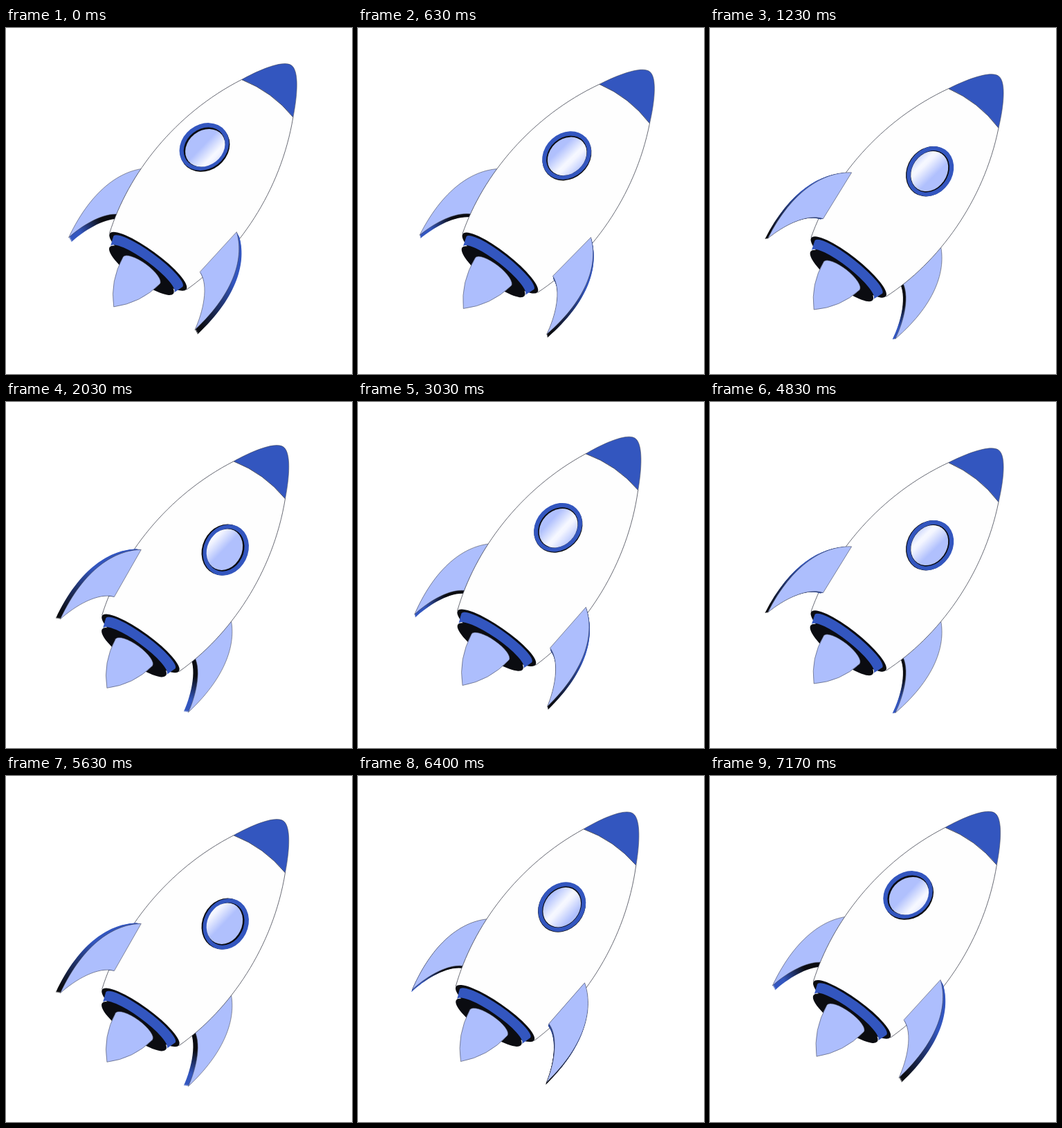
An HTML page with a canvas for the animation above (7210 ms loop, 500 px wide and 500 px high).

```html
<!DOCTYPE html>
<html>
<head>
<meta charset="utf-8">
<style>
html, body { margin: 0; width: 100%; height: 100%; overflow: hidden; background: #fff; }
canvas { display: block; }
</style>
</head>
<body>
<canvas id="stage" width="500" height="500"></canvas>
<script>
const ctx = document.getElementById('stage').getContext('2d');
const LOOP = 7210, SWAY = 3600;
const BLUE = '#3356bf', LIGHT = '#adbefd', BLACK = '#0b0c11', LINE = '#3c3f4c';

// Upright rocket: the origin is the centre of the base, the nose points up.
const body = new Path2D('M-69 0C-98 -85 -95 -195 -46 -292Q0 -304 46 -292C95 -195 98 -85 69 0Z');
const nose = new Path2D('M-46 -292C-33 -320 -14 -351 0 -351C14 -351 33 -320 46 -292Q0 -304 -46 -292Z');
const collar = new Path2D('M-62 0A62 13 0 0 1 62 0L57 14A57 13 0 0 0 -57 14Z');
const finShape = new Path2D('M81.5 -110C112 -88 134 -40 118 40C112 12 96 -24 72.5 -32Z');

function paint(path, fill, line) {
  ctx.fillStyle = fill;
  ctx.fill(path);
  if (line) {
    ctx.strokeStyle = LINE;
    ctx.lineWidth = line;
    ctx.stroke(path);
  }
}

function oval(x, y, rx, ry, fill, turn = 0) {
  const path = new Path2D();
  path.ellipse(x, y, rx, ry, turn, 0, 2 * Math.PI);
  paint(path, fill);
}

function blend(x0, y0, x1, y1, ...stops) {
  const g = ctx.createLinearGradient(x0, y0, x1, y1);
  stops.forEach(([at, color]) => g.addColorStop(at, color));
  return g;
}

// side is 1 for the right fin, -1 for the left one; shift moves its far face.
function fin(side, shift) {
  const squash = Math.sqrt(1 - (shift / 24) ** 2);
  const edge = side * shift < 0
    ? blend(0, -50, 0, 30, [0, BLUE], [1, BLACK])
    : blend(0, -10, 0, 22, [0, BLACK], [1, BLUE]);
  for (let i = 8; i >= 0; i--) {
    ctx.save();
    ctx.translate(-shift * i / 8, 3.2 * i / 8);
    ctx.scale(side * squash, 1);
    paint(finShape, i ? edge : LIGHT, i ? 0 : 0.5);
    ctx.restore();
  }
}

function porthole(lat, shift) {
  ctx.save();
  ctx.translate(lat, -181.4);
  const turn = -lat * Math.PI / 360, slide = -shift * 0.28;
  oval(slide * 0.6, 0.5, 32.2, 38, BLACK, turn);
  oval(-slide * 0.4, -0.3, 32, 38, BLUE, turn);
  oval(-slide * 0.2, 0, 26, 32, BLACK, turn);
  const glint = -0.85 * lat - 10;
  oval(slide * 0.7, 0.3, 25, 30.8,
    blend(glint - 20, 0, glint + 24, 6, [0, '#b0c0fd'], [0.45, '#f6f8ff'], [0.55, '#f3f5ff'], [1, '#b0c0fd']), turn);
  ctx.restore();
}

function flame(t) {
  const tip = 82 + 4 * Math.cos(2 * Math.PI * t / 240 - 4.8);
  const mid = tip * 0.67;
  paint(new Path2D(`M-33 16A33 11 0 0 1 33 16Q27 ${mid} -1.3 ${tip}Q-28 ${mid} -33 16Z`), LIGHT, 0.5);
}

function draw(t) {
  const a = 2 * Math.PI * t / SWAY;
  const wave = (mid, c, s) => mid + c * Math.cos(a) + s * Math.sin(a);
  const lat = wave(-5.5, -26.2, -2.4);
  const shift = (lat + 4) * 0.25;
  const near = shift < 0 ? 1 : -1;

  ctx.fillStyle = '#fff';
  ctx.fillRect(0, 0, 500, 500);
  ctx.save();
  ctx.translate(wave(200.3, 5, 3.2), wave(343.1, -5.8, -1));
  ctx.rotate(wave(36.5, -0.3, 1.85) * Math.PI / 180);

  fin(-near, shift);
  paint(body, '#fefefe', 0.7);
  paint(nose, BLUE, 0.5);
  oval(0, 0, 68.5, 16, BLACK);
  oval(0, 16, 57, 15, BLACK);
  paint(collar, BLUE);
  flame(t);
  porthole(lat, shift);
  fin(near, shift);
  ctx.restore();
}

const start = performance.now();
function tick() {
  draw((performance.now() - start) % LOOP);
  requestAnimationFrame(tick);
}
tick();
</script>
</body>
</html>
```
